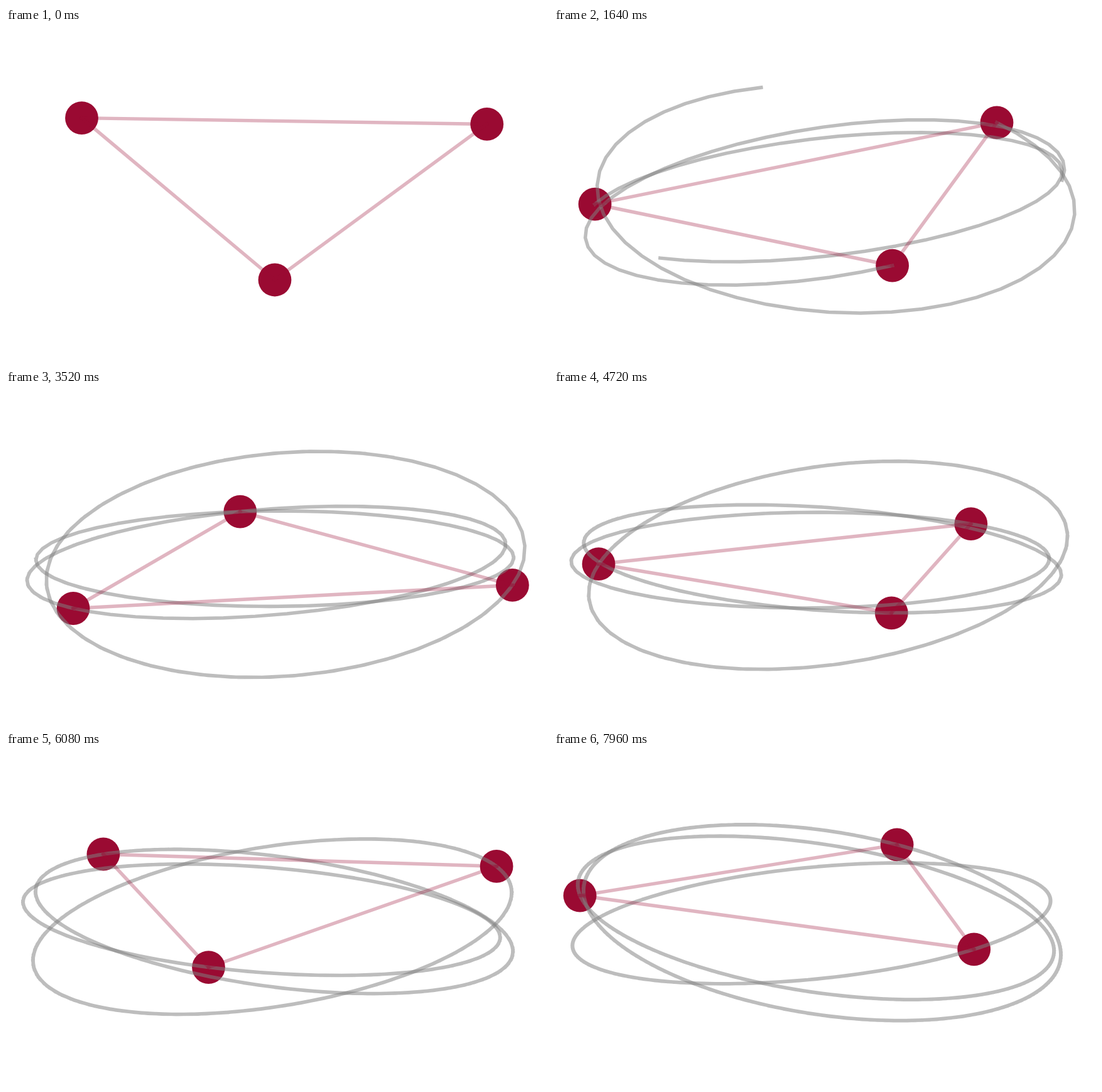
An HTML page with a canvas for the animation above (8 s loop, 863 by 533 pixels).

```html
<!DOCTYPE html>
<html lang="en">
<head>
<meta charset="utf-8">
<title>Three orbits</title>
<style>
  html, body { margin: 0; width: 100%; height: 100%; overflow: hidden; background: #fff; }
  canvas { display: block; }
</style>
</head>
<body>
<canvas id="stage" width="863" height="533"></canvas>
<script>
const ctx = document.getElementById('stage').getContext('2d');
const RAD = Math.PI / 180;
const STEPS = 200;
const STEP_MS = 40;
const TURN = 4 * 360 / (STEPS - 1);   // orbit degrees per step
const SPIN = 1;                       // camera degrees per step

const RADIUS = 380;
const LIFT = 57.5;
const DISTANCE = 7170;
const CENTER = { x: 428, y: 265.2 };
const SIN_ELEV = Math.sin(20 * RAD);
const COS_ELEV = Math.cos(20 * RAD);

const RED = '#9a0a32';
const EDGE = 'rgba(154, 10, 50, 0.3)';
const TRAIL = 'rgba(128, 128, 128, 0.52)';

// start angle, phase of the height wave, offset of the orbit's centre
const bodies = [
  { start: 150, wave: 90, shift: 21.4, toward: 48.5 },
  { start: 30, wave: 90, shift: 21.2, toward: -43 },
  { start: 270, wave: 0, shift: 0, toward: 0 }
];

function project(body, step, camera) {
  const turn = step * TURN;
  const angle = (body.start + turn - camera) * RAD;
  const offset = (body.toward - camera) * RAD;
  const x = RADIUS * Math.cos(angle) + body.shift * Math.cos(offset);
  const away = RADIUS * Math.sin(angle) + body.shift * Math.sin(offset);
  const up = LIFT * Math.sin((body.wave + turn) * RAD);
  const depth = 1 + (away * COS_ELEV - up * SIN_ELEV) / DISTANCE;
  return [
    CENTER.x + x / depth,
    CENTER.y - (away * SIN_ELEV + up * COS_ELEV) / depth
  ];
}

function strokeLine(points, color) {
  ctx.strokeStyle = color;
  ctx.beginPath();
  for (const p of points) ctx.lineTo(...p);
  ctx.stroke();
}

function draw(step) {
  const camera = step * SPIN;
  const heads = bodies.map(b => project(b, step, camera));

  ctx.fillStyle = '#fff';
  ctx.fillRect(0, 0, 863, 533);
  ctx.lineWidth = 5.5;
  ctx.lineCap = 'square';
  ctx.lineJoin = 'round';

  ctx.fillStyle = RED;
  for (const [x, y] of heads) {
    ctx.beginPath();
    ctx.arc(x, y, 26.4, 0, 2 * Math.PI);
    ctx.fill();
  }

  // the whole path so far, seen from the present camera angle
  if (step > 0) {
    for (const body of bodies) {
      const path = Array.from({ length: step + 1 }, (_, i) => project(body, i, camera));
      strokeLine(path, TRAIL);
    }
  }

  heads.forEach((p, i) => strokeLine([p, heads[(i + 1) % 3]], EDGE));
}

const begin = performance.now();
let shown = -1;

function tick() {
  const step = Math.floor((performance.now() - begin) / STEP_MS) % STEPS;
  if (step !== shown) draw(shown = step);
  requestAnimationFrame(tick);
}
tick();
</script>
</body>
</html>
```
